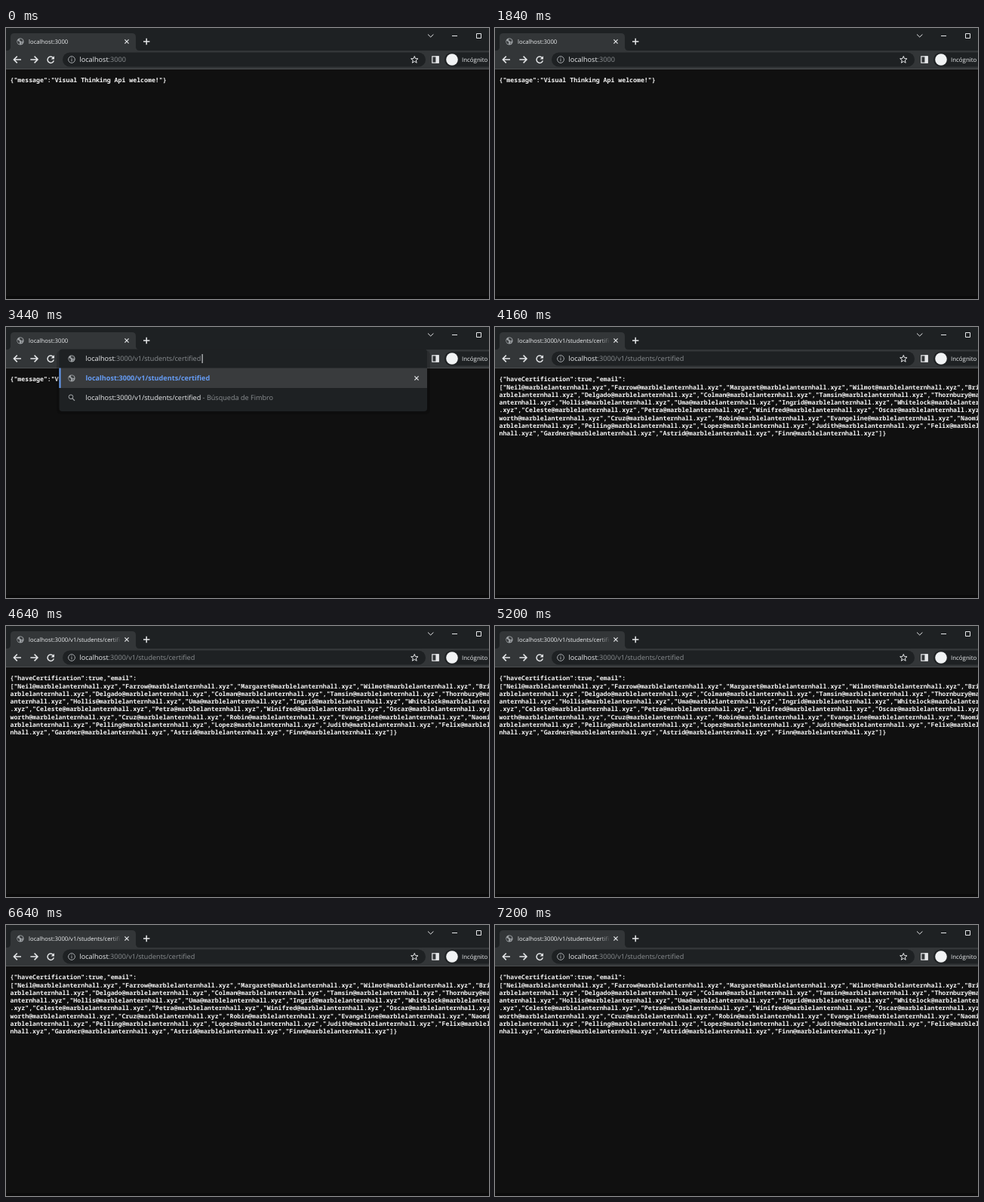
Recreate the animation shown at these times as an HTML page. Size 640 px wide and 360 px high, loop 7280 ms.

```html
<!DOCTYPE html>
<html lang="es">
<head>
<meta charset="utf-8">
<title>localhost:3000</title>
<style>
  html, body { margin: 0; width: 100%; height: 100%; overflow: hidden; background: #101010; }
  svg { display: block; width: 640px; height: 360px; }
  text { white-space: pre; text-rendering: geometricPrecision; }
  .ui { font: 500 9.1px "Open Sans", "Noto Sans", sans-serif; fill: #eceef0; }
  .small { font-size: 7.9px; }
  .title { font-size: 7.75px; }
  .dim { font-weight: 400; fill: #8b8f92; }
  .link { font-weight: 700; fill: #669df6; }
  .mono { font: 600 8.23px "Noto Sans Mono", "DejaVu Sans Mono", monospace; fill: #f4f4f4; }
  .line { fill: none; stroke: #e6e8ea; stroke-width: 1.2; }
  .thin { stroke-width: 1; }
  .bold { stroke-width: 1.5; }
  .soft { stroke: #a5a9ac; }
</style>
</head>
<body>
<svg viewBox="0 0 640 360">
  <defs>
    <linearGradient id="fade" gradientUnits="userSpaceOnUse" x1="139" x2="153" y1="0" y2="0">
      <stop offset="0" stop-color="#eceef0"/>
      <stop offset="1" stop-color="#eceef0" stop-opacity="0"/>
    </linearGradient>
    <g id="globe">
      <circle r="4.6" fill="#a0a4a7"/>
      <path d="M-3.6-1.2 L-1.2 .2 L-.6 2 L-1.6 3.8 A4 4 0 0 1-3.6-1.2Z M-.6-3.8 L2.4-3.2 L3.6-.6 L1.8 .6 L.4-.8 L-1.2-1.4Z M1.2 1.6 L3 1.4 L1.6 3.4Z" fill="#3b3e40"/>
    </g>
    <path id="cross" class="line" d="M-2.6-2.6 L2.6 2.6 M2.6-2.6 L-2.6 2.6"/>
    <path id="arrow" class="line bold" d="M5 0 H-4.4 M-.2-4.4 L-4.6 0 L-.2 4.4"/>
  </defs>

  <!-- window and tab -->
  <rect width="640" height="360" fill="#101010"/>
  <rect y="356" width="640" height="4" fill="#0b0b0b"/>
  <rect width="640" height="31" fill="#1e2123"/>
  <rect y="30" width="640" height="25" fill="#333638"/>
  <rect y="54" width="640" height="1" fill="#4b4d4f"/>
  <path d="M1 30 Q6 30 6 25 V12 Q6 7 11 7 H167 Q172 7 172 12 V25 Q172 30 177 30Z" fill="#333638"/>
  <use href="#globe" x="19" y="18"/>
  <use href="#cross" x="160" y="18"/>
  <path class="line bold" d="M182 18 H190.4 M186.2 13.8 V22.2"/>
  <path class="line thin" d="M559 8.5 L562.7 12 L566.4 8.5 M591 10.5 H598 M623.5 7.5 H629.5 V13.5 H623.5Z"/>

  <!-- toolbar -->
  <use href="#arrow" x="15" y="42"/>
  <use href="#arrow" transform="translate(37.4 42) scale(-1 1)"/>
  <path class="line bold" d="M62.4 39.4 A4.2 4.2 0 1 0 63.3 43.4"/>
  <path d="M64 37.2 V41.6 H59.6Z" fill="#e6e8ea"/>
  <rect x="75" y="32.5" width="481" height="19" rx="9.5" fill="#1e2123"/>
  <circle class="line thin soft" cx="87" cy="42" r="4.4"/>
  <path class="line thin soft" d="M87 41.2 V44.4 M87 39.3 V40.3"/>
  <path id="star" class="line thin"/>
  <rect class="line" x="564.8" y="37.8" width="8.4" height="8.4"/>
  <rect x="569.4" y="37.4" width="4.2" height="9.2" fill="#e6e8ea"/>
  <rect x="581" y="32.5" width="80" height="19" rx="9.5" fill="#1e2123"/>
  <circle cx="591" cy="42" r="7.8" fill="#f1f3f4"/>
  <text class="ui small" x="604" y="44.8">Incógnito</text>

  <g id="home">
    <text class="ui title" x="30" y="20.7">localhost:3000</text>
    <text class="ui" x="97.5" y="45.3">localhost<tspan class="dim">:3000</tspan></text>
    <text class="mono" x="5.5" y="72.2">{"message":"Visual Thinking Api welcome!"}</text>
  </g>

  <g id="menu">
    <rect x="67" y="31" width="495" height="85" rx="6" fill="#000" opacity=".18"/>
    <rect x="70.5" y="29.5" width="487.5" height="82.5" rx="4" fill="#1e2123"/>
    <rect x="70.5" y="54.5" width="487.5" height="26.5" fill="#393b3d"/>
    <rect x="70.5" y="54.5" width="2" height="26.5" fill="#669df6"/>
    <use href="#globe" x="87" y="42"/>
    <use href="#globe" x="87" y="68"/>
    <circle class="line thin soft" cx="86" cy="92.8" r="2.8"/>
    <path class="line soft" d="M88 94.8 L91 97.8"/>
    <text class="ui" x="105.5" y="45.3">localhost<tspan class="dim">:3000/v1/students/certified</tspan></text>
    <rect x="259.6" y="36" width="1" height="12" fill="#e8eaed"/>
    <text class="ui link" x="105.5" y="71.3">localhost:3000/v1/students/certified</text>
    <text class="ui" x="105.5" y="97.3">localhost:3000/v1/students/certified<tspan class="dim"> - Búsqueda de Fimbro</tspan></text>
    <use href="#cross" x="544" y="68"/>
  </g>

  <g id="result">
    <text class="ui title" x="30" y="20.7" style="fill:url(#fade)">localhost:3000/v1/students/certifi</text>
    <text class="ui" x="97.5" y="45.3">localhost<tspan class="dim">:3000/v1/students/certified</tspan></text>
  </g>
</svg>
<script>
  const LOOP = 7280, MENU_AT = 3040, RESULT_AT = 4160;
  const DOMAIN = "marblelanternhall.xyz";
  const byId = id => document.getElementById(id);
  const home = byId("home"), menu = byId("menu"), result = byId("result");

  const points = Array.from({ length: 10 }, (_, i) => {
    const r = i % 2 ? 2.1 : 4.9, a = i * Math.PI / 5 - Math.PI / 2;
    return `${(541.3 + r * Math.cos(a)).toFixed(2)} ${(42.3 + r * Math.sin(a)).toFixed(2)}`;
  });
  byId("star").setAttribute("d", `M${points.join("L")}Z`);

  // Each row opens with the rest of an address broken by the line wrap.
  const mails = names => names.split(" ").map(n => `"${n}@${DOMAIN}"`).join(",");
  const row = (skip, names) => `${DOMAIN.slice(skip)}",${mails(names)}`;
  const rows = [
    '{"haveCertification":true,"email":',
    "[" + mails("Neil Farrow Margaret Wilmot Bri"),
    row(1, "Delgado Colman Tamsin Thornbury"),
    row(7, "Hollis Uma Ingrid Whitelock"),
    row(17, "Celeste Petra Winifred Oscar"),
    "worth@" + row(0, "Cruz Robin Evangeline Naomi"),
    row(1, "Pelling Lopez Judith Felix"),
    row(12, "Gardner Astrid Finn") + "]}"
  ];
  rows.forEach((content, i) => {
    const text = document.createElementNS("http://www.w3.org/2000/svg", "text");
    text.setAttribute("class", "mono");
    text.setAttribute("x", 5.5);
    text.setAttribute("y", 72.2 + i * 10.3);
    text.textContent = content;
    result.append(text);
  });

  const show = (el, on) => { el.style.display = on ? "" : "none"; };
  function draw() {
    const t = performance.now() % LOOP;
    show(home, t < RESULT_AT);
    show(menu, t >= MENU_AT && t < RESULT_AT);
    show(result, t >= RESULT_AT);
    requestAnimationFrame(draw);
  }
  draw();
</script>
</body>
</html>
```
